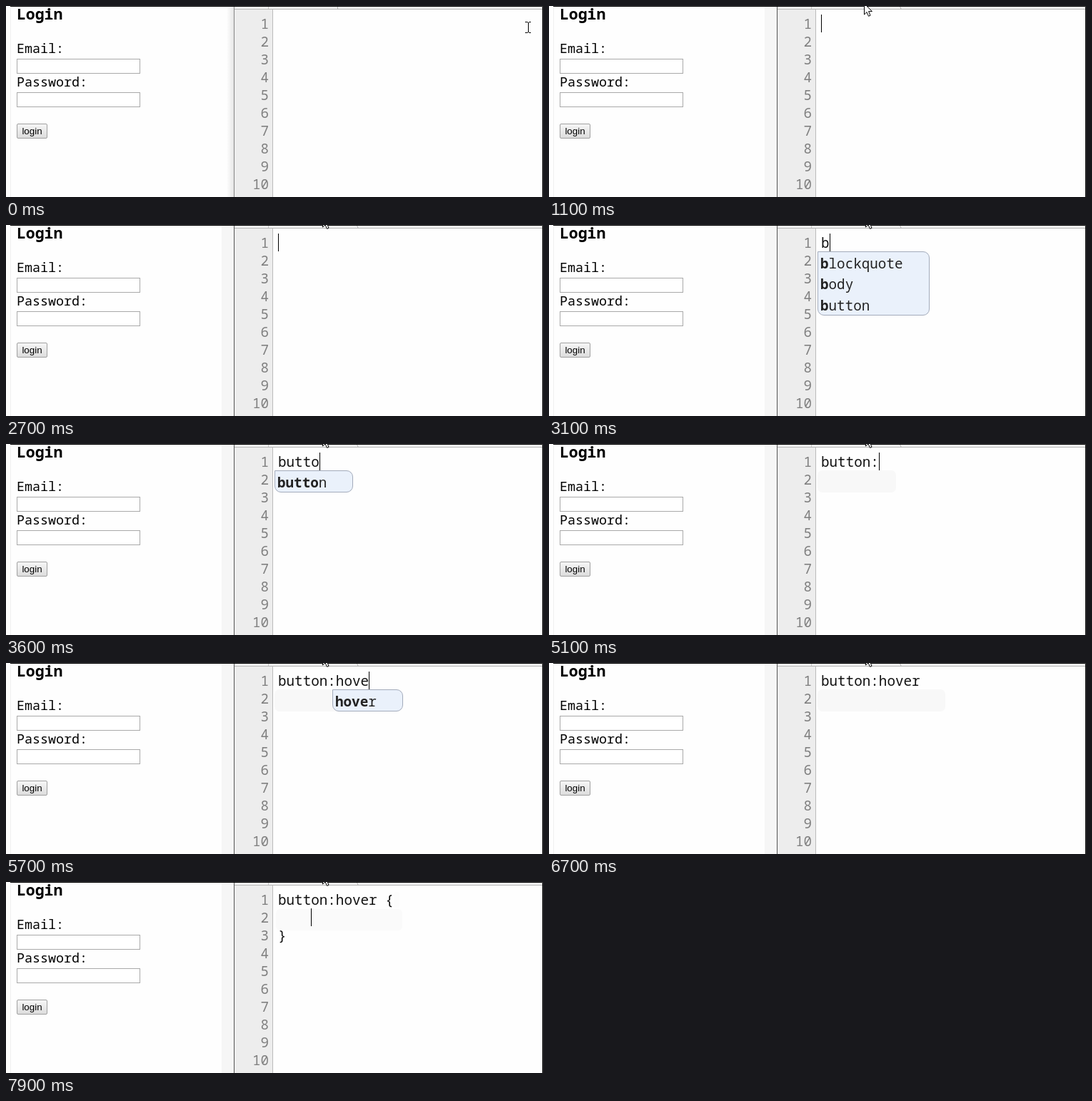
Recreate the animation shown at these times as an HTML page. Size 752 by 268 pixels, loop 8000 ms.

```html
<!DOCTYPE html>
<html lang="en">
<head>
<meta charset="utf-8">
<title>Login button styling</title>
<style>
  html, body { margin: 0; width: 100%; height: 100%; overflow: hidden; background: #fefefe; }
  svg, div { position: absolute; }
  svg { left: 0; top: 0; }
  #code, #popup, .mono { font-family: "Noto Sans Mono", monospace; font-size: 19.25px; }
  #code { left: 381px; top: 12px; line-height: 25px; white-space: pre; color: #111; }
  #popup {
    top: 37px; padding: 0 36px 0 3px; border: 1px solid #a3abbb;
    border-radius: 0 9px 9px 9px; background: #eaf1fb; color: #222; white-space: pre;
  }
  #popup div { position: static; height: 29.3px; line-height: 31px; }
  #caret { width: 1px; height: 25px; background: #000; }
</style>
</head>
<body>
<svg width="752" height="268">
  <defs>
    <linearGradient id="face" x2="0" y2="1">
      <stop stop-color="#f6f6f6"/><stop offset="1" stop-color="#dcdcdc"/>
    </linearGradient>
    <linearGradient id="shade">
      <stop stop-color="#fefefe"/><stop offset="1" stop-color="#e6e6e6"/>
    </linearGradient>
  </defs>
  <path d="M6.5 0V268" stroke="#f0f0f0"/>
  <g class="mono">
    <text x="15" y="19" font-weight="700" style="font-size:21.45px">Login</text>
    <g style="font-size:18.33px"><text x="15" y="66">Email:</text><text x="15" y="113">Password:</text></g>
  </g>
  <g fill="#fff" stroke="#a9a9a9">
    <rect x="15.5" y="74.5" width="172" height="20"/>
    <rect x="15.5" y="121.5" width="172" height="20"/>
    <rect x="15.5" y="165.5" width="42" height="20" rx="1.5" fill="url(#face)" stroke="#a0a0a0"/>
  </g>
  <text x="36.5" y="180" text-anchor="middle" font-family="Liberation Sans, Arial, sans-serif" font-size="13.33">login</text>

  <rect id="softEdge" x="309" width="10" height="268" fill="url(#shade)"/>
  <rect id="flatEdge" x="302" width="17" height="268" fill="#f6f6f6"/>
  <rect x="320" y="5" width="54" height="263" fill="#ededed"/>
  <path d="M373.5 5V268" stroke="#bbb"/>
  <rect x="320" width="431" height="4" fill="#f3f3f3"/>
  <path d="M320 4.5H751" stroke="#b8b8b8"/>
  <path d="M367.5 1V4" stroke="#c4c4c4"/>
  <path id="tab" stroke="#b0b0b0"/>
  <path id="divider" d="M319.5 0V268"/>
  <g id="numbers" class="mono" fill="#808080" font-weight="500" text-anchor="end"></g>
  <path d="M6 .5H751.5V268" fill="none" stroke="#000"/>

  <rect id="buttonGhost" x="376" y="37" width="110" height="31" rx="7" fill="#f8f8f8"/>
  <rect id="hoverGhost" x="457" y="37" width="98" height="31" rx="7" fill="#f8f8f8"/>
  <g id="lateGhost" fill="#fafafa">
    <rect x="378" y="38" width="177" height="30" rx="6"/>
    <rect x="543" y="14" width="8" height="22" rx="4" fill="#fcfcfc"/>
  </g>
</svg>
<div id="code"></div>
<div id="popup"></div>
<div id="caret"></div>
<svg width="752" height="268">
  <path id="beam" d="M-4 -7.5H-1L.5 -6.5L2 -7.5H4M.5 -6.5V6.5M-4 7.5H-1L.5 6.5L2 7.5H4" fill="none" stroke="#000"/>
  <path id="arrow" d="M.5 .5V16L4 12.6L6.5 18.3L9 17.2L6.6 11.6H11.4Z" fill="#fff" stroke="#000"/>
</svg>
<script>
const LOOP = 8000, CELL = 11.55, LEFT = 381;
const words = ["blockquote", "body", "button", "hover"];

// Editor contents from each time on; "|" is the visible caret.
const typing = [
  [0, ""], [800, "|"], [1300, ""], [1800, "|"], [2300, ""], [2700, "|"],
  [3100, "b|"], [3200, "bu|"], [3400, "but|"], [3500, "butt|"], [3600, "butto|"], [3700, "button|"],
  [4200, "button"], [4300, "button;|"], [4800, "button;"], [4900, "button|"], [5100, "button:|"],
  [5300, "button:h|"], [5400, "button:ho|"], [5600, "button:hov|"], [5700, "button:hove|"],
  [5800, "button:hover|"], [6200, "button:hover |"], [6700, "button:hover "], [6800, "button:hover {|}"],
  [7000, "button:hover {\n    |\n}"], [7500, "button:hover {\n    \n}"], [7900, "button:hover {\n    |\n}"]
];
// Pointer positions after its first sweep
const pointer = [[500, 440, 17], [900, 440, 9], [1000, 441, 0], [1100, 441, -4],
  [1200, 441, -6], [1300, 441, -8], [1500, 443, -13]];

const $ = id => document.getElementById(id);
const show = (id, on) => { $(id).style.display = on ? "" : "none"; };
const latest = (keys, t) => keys.findLast(key => key[0] <= t);

$("numbers").innerHTML = Array.from({ length: 10 }, (_, i) =>
  `<text x="368" y="${32 + 25 * i}">${i + 1}</text>`).join("");

function drawEditor(t) {
  const marked = latest(typing, t)[1];
  const text = marked.replace("|", "");
  $("code").textContent = text;

  const before = marked.split("|")[0].split("\n");
  show("caret", marked.includes("|"));
  $("caret").style.left = Math.round(LEFT + before.at(-1).length * CELL) + "px";
  $("caret").style.top = 12 + 25 * (before.length - 1) + "px";

  const prefix = text.match(/\w*$/)[0];
  const matches = prefix ? words.filter(w => w.startsWith(prefix) && w !== prefix) : [];
  show("popup", matches.length);
  $("popup").style.left = Math.round(LEFT - 5 + (text.length - prefix.length) * CELL) + "px";
  $("popup").innerHTML = matches.map(w =>
    `<div><b>${prefix}</b>${w.slice(prefix.length)}</div>`).join("");
}

function drawPointer(t) {
  let x, y;
  if (t < 500) {
    const p = t / 500, ease = p * p * (3 - 2 * p);
    x = Math.round(731 - 291 * ease);
    y = Math.round(30 - 13 * ease);
  } else {
    [, x, y] = latest(pointer, t);
  }
  const id = t < 1000 ? "beam" : "arrow";
  show("beam", id === "beam");
  show("arrow", id === "arrow");
  $(id).setAttribute("transform", `translate(${x} ${y})`);
}

function draw(now) {
  const t = Math.floor(now % LOOP / 100) * 100;
  const focused = t >= 800;
  show("softEdge", !focused);
  show("flatEdge", focused);
  $("divider").setAttribute("stroke", focused ? "#555" : "#888");
  $("tab").setAttribute("d", focused ? "M491.5 1L493 4" : "M464.5 1V4");
  show("buttonGhost", t >= 3700 && t < 7000);
  show("hoverGhost", t >= 5800 && t < 7000);
  show("lateGhost", t >= 7000);
  drawEditor(t);
  drawPointer(t);
}

const start = performance.now();
(function tick() {
  draw(performance.now() - start);
  requestAnimationFrame(tick);
})();
</script>
</body>
</html>
```
